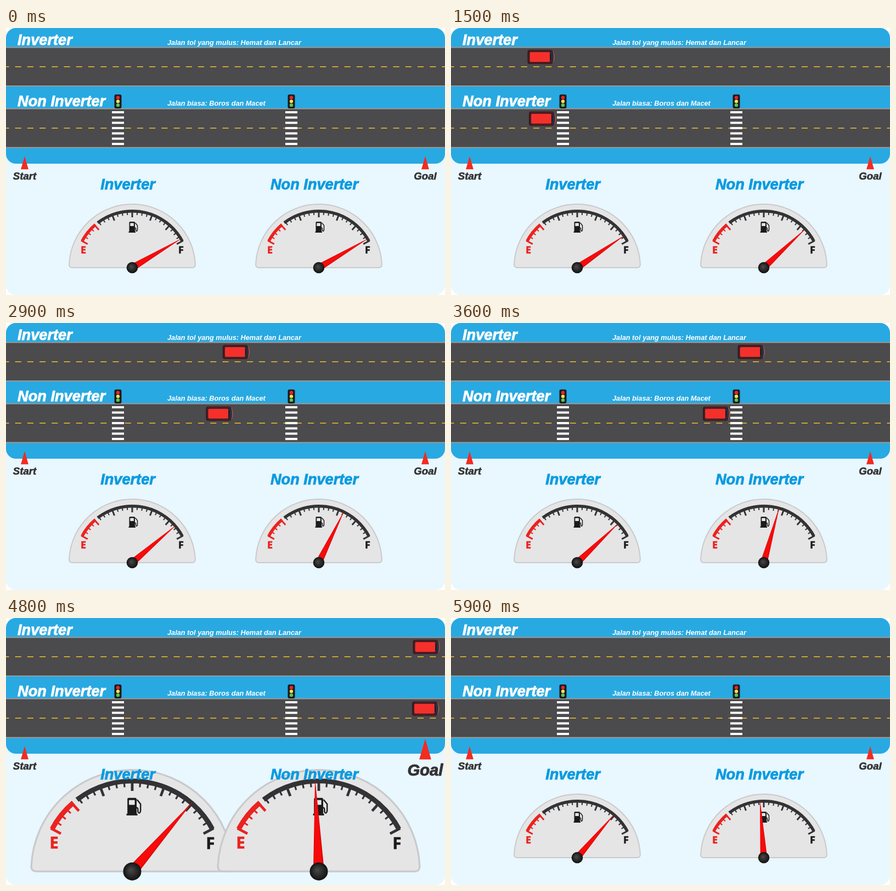
An HTML page with a canvas for the animation above (6000 ms loop, 800 px wide and 488 px high).

```html
<!DOCTYPE html>
<html lang="id">
<head>
<meta charset="utf-8">
<title>Inverter vs Non Inverter</title>
<style>
html, body { margin: 0; width: 100%; height: 100%; overflow: hidden; background: #fff; }
canvas { display: block; width: 800px; height: 488px; }
</style>
</head>
<body>
<canvas id="stage" width="800" height="488"></canvas>
<script>
const ctx = document.getElementById('stage').getContext('2d');
const LOOP = 6000, STEP = 100;
const SANS = '"Liberation Sans", Arial, sans-serif';
const FACE = '"Open Sans", sans-serif';
const RED = '#ea2320', DARK = '#333234', BLACK = '#1c1b1c', BLUE = '#0a9be0';
const rad = deg => deg * Math.PI / 180;
const smooth = u => u * u * (3 - 2 * u);

// Piecewise linear value over [time, value] keys, held at both ends.
function track(keys, t) {
  if (t <= keys[0][0]) return keys[0][1];
  for (let i = 1; i < keys.length; i++) {
    const [t0, v0] = keys[i - 1], [t1, v1] = keys[i];
    if (t <= t1) return v0 + (v1 - v0) * (t - t0) / (t1 - t0);
  }
  return keys[keys.length - 1][1];
}

const SMOOTH_ROAD = [[430, -55], [1500, 139.5], [4800, 741.5], [5170, 808]];
const STOP_AND_GO = [[430, -53], [1500, 142], [1960, 142], [3300, 459],
                     [3975, 459], [4800, 740], [5170, 808]];
const THRIFTY = [[670, 59.4], [4900, 40.4]];
const WASTEFUL = [[670, 59.4], [4900, -3.8]];

function pulse(t, peak, amount) {
  const d = t - peak;
  const u = d < 0 ? 1 + d / 200 : 1 - d / 125;
  return 1 + amount * smooth(Math.max(0, u));
}

function box(x, y, w, h, r, fill) {
  ctx.fillStyle = fill;
  ctx.beginPath();
  ctx.roundRect(x, y, w, h, r);
  ctx.fill();
}

function disc(x, y, r, fill) {
  ctx.fillStyle = fill;
  ctx.beginPath();
  ctx.arc(x, y, r, 0, 2 * Math.PI);
  ctx.fill();
}

function polygon(points, fill) {
  ctx.fillStyle = fill;
  ctx.beginPath();
  points.forEach(([x, y]) => ctx.lineTo(x, y));
  ctx.fill();
}

function line(x0, y0, x1, y1, color, width) {
  ctx.strokeStyle = color;
  ctx.lineWidth = width;
  ctx.beginPath();
  ctx.moveTo(x0, y0);
  ctx.lineTo(x1, y1);
  ctx.stroke();
}

// A thin outline in the fill colour gives the heavier weight.
function label(str, x, y, { font, color, align = 'left', weight = 0 }) {
  ctx.font = font;
  ctx.textAlign = align;
  ctx.fillStyle = ctx.strokeStyle = color;
  ctx.fillText(str, x, y);
  if (!weight) return;
  ctx.lineWidth = weight;
  ctx.lineJoin = 'miter';
  ctx.strokeText(str, x, y);
}

const italic = size => `italic bold ${size}px ${SANS}`;
const LANE_TITLE = { font: italic(27.2), color: '#fff', weight: 0.9 };
const GAUGE_TITLE = { ...LANE_TITLE, color: BLUE, align: 'center' };
const SUBTITLE = { font: italic(12.73), color: '#fff' };
const MARKER_TEXT = { font: italic(18.6), color: DARK, align: 'center', weight: 0.6 };
const DIAL_TEXT = { font: `bold 18px ${FACE}`, align: 'center', weight: 0.5 };

function scaledAt(x, y, scale, draw) {
  ctx.save();
  ctx.translate(x, y);
  ctx.scale(scale, scale);
  draw();
  ctx.restore();
}

function road(top, bottom) {
  box(0, top - 1, 800, bottom - top + 2, 0, '#9b9a96');
  box(0, top + 1, 800, bottom - top - 2, 0, '#4b4a4c');
  const period = 800 / 36, mid = (top + bottom) / 2;
  ctx.setLineDash([period / 2, period / 2]);
  ctx.lineDashOffset = period / 4;
  line(0, mid, 800, mid, '#f3c32c', 1.7);
  ctx.setLineDash([]);
}

function crossing(x) {
  for (let i = 0; i < 7; i++) box(x - 11, 152 + i * 9.65, 22, 4, 0, '#fff');
  box(x - 6.5, 121.5, 13, 25.5, 3, '#1d1b1c');
  ['#e8262a', '#f8e05a', '#4fc95a'].forEach((c, i) => disc(x, 127.3 + i * 6.8, 3.2, c));
}

function car(x, y) {
  ctx.save();
  ctx.translate(x, y);
  box(0, 0.5, 46, 26, 4, '#30191e');
  box(2, 2, 45, 23, 4, '#8c1a1e');
  box(2.5, 3, 44, 21, 3, '#1d222b');
  box(4, 4.5, 37, 18, 2, '#f5302b');
  box(41, 5, 4.5, 17, 2, '#24384a');
  line(42, 7, 42, 20, '#11161d', 2);
  ctx.strokeStyle = '#a8555a';
  ctx.lineWidth = 1.3;
  ctx.beginPath();
  ctx.moveTo(46.5, 3.5);
  ctx.quadraticCurveTo(51, 13.5, 46.5, 23.5);
  ctx.stroke();
  ctx.restore();
}

function marker(str, x, scale) {
  scaledAt(x, 258, scale, () => {
    polygon([[0, -23.5], [6.9, 0.3], [-6.9, 0.3]], '#f32b20');
    label(str, 0, 19.3, MARKER_TEXT);
  });
}

function pump() {
  box(-5.5, -84, 10.5, 19, 1.5, BLACK);
  box(-3.7, -81.5, 6.6, 5.5, 0.5, '#e6e6e7');
  box(-6.5, -66, 12.5, 2, 0, BLACK);
  ctx.strokeStyle = BLACK;
  ctx.lineWidth = 1.5;
  ctx.beginPath();
  ctx.moveTo(4, -73);
  ctx.quadraticCurveTo(6.5, -73, 6.5, -71);
  ctx.lineTo(6.5, -68);
  ctx.quadraticCurveTo(8.5, -65, 9.5, -69);
  ctx.lineTo(9.5, -77);
  ctx.lineTo(5.5, -82);
  ctx.stroke();
}

function scaleArc(from, to, color) {
  ctx.strokeStyle = color;
  ctx.lineWidth = 5.6;
  ctx.beginPath();
  ctx.arc(0, 0, 103.3, rad(from - 90), rad(to - 90));
  ctx.stroke();
}

function tick(deg, inner, color, width) {
  ctx.save();
  ctx.rotate(rad(deg));
  line(0, -105, 0, -inner, color, width);
  ctx.restore();
}

function dial() {
  ctx.beginPath();
  ctx.moveTo(-109, 0);
  ctx.quadraticCurveTo(-115, 0, -115, -6);
  ctx.arc(0, -1, 115, rad(182.5), rad(357.5));
  ctx.quadraticCurveTo(115, 0, 109, 0);
  ctx.closePath();
  ctx.fillStyle = '#e5e5e6';
  ctx.fill();
  ctx.strokeStyle = '#c9cacc';
  ctx.lineWidth = 2;
  ctx.stroke();

  scaleArc(-62, -40.5, RED);
  scaleArc(-37.5, 62, DARK);
  const division = 62 / 12;
  for (let i = -12; i <= 12; i++) {
    const major = i % 4 === 0;
    tick(i * division, major ? 92 : 96.5, i <= -8 ? RED : DARK, major ? 3 : 2);
  }
  label('E', -89, -26.2, { ...DIAL_TEXT, color: RED });
  label('F', 89, -26, { ...DIAL_TEXT, color: BLACK });
  pump();
}

function needle(deg) {
  ctx.save();
  ctx.rotate(rad(deg));
  polygon([[-6.3, 0], [0, -106], [6.3, 0]], '#d80808');
  polygon([[-5.3, 0], [0, -104], [4.6, 0]], '#f80a0a');
  ctx.restore();
  const shade = ctx.createRadialGradient(-2, -2, 0, 0, 0, 10.3);
  shade.addColorStop(0, '#4a4a4a');
  shade.addColorStop(1, '#121212');
  disc(0, 0, 10.3, shade);
}

function gauge(x, deg, scale) {
  scaledAt(x, 396, scale, () => {
    ctx.translate(0, 42);
    dial();
    needle(deg);
  });
}

function render(t) {
  ctx.clearRect(0, 0, 800, 488);
  box(0, 0, 800, 488, 18, '#e9f7fe');
  box(0, 0, 800, 248, 18, '#28a9e2');
  road(35.5, 106);
  road(147.5, 218.5);
  crossing(204);
  crossing(520);

  label('Inverter', 21, 30.5, LANE_TITLE);
  label('Non Inverter', 21, 142.5, LANE_TITLE);
  label('Jalan tol yang mulus: Hemat dan Lancar', 294, 30.5, SUBTITLE);
  label('Jalan biasa: Boros dan Macet', 294, 142.4, SUBTITLE);

  car(track(SMOOTH_ROAD, t), 39.5);
  car(track(STOP_AND_GO, t), 152.3);
  marker('Start', 34, pulse(t, 800, 0.57));
  marker('Goal', 764, pulse(t, 4800, 0.57));

  const zoom = pulse(t, 4800, 0.6);
  gauge(230, track(THRIFTY, t), zoom);
  gauge(570, track(WASTEFUL, t), zoom);
  label('Inverter', 222, 294.7, GAUGE_TITLE);
  label('Non Inverter', 562, 294.7, GAUGE_TITLE);
}

const start = performance.now();
function animate() {
  const t = (performance.now() - start) % LOOP;
  render(Math.floor(t / STEP) * STEP);
  requestAnimationFrame(animate);
}
animate();
</script>
</body>
</html>
```
